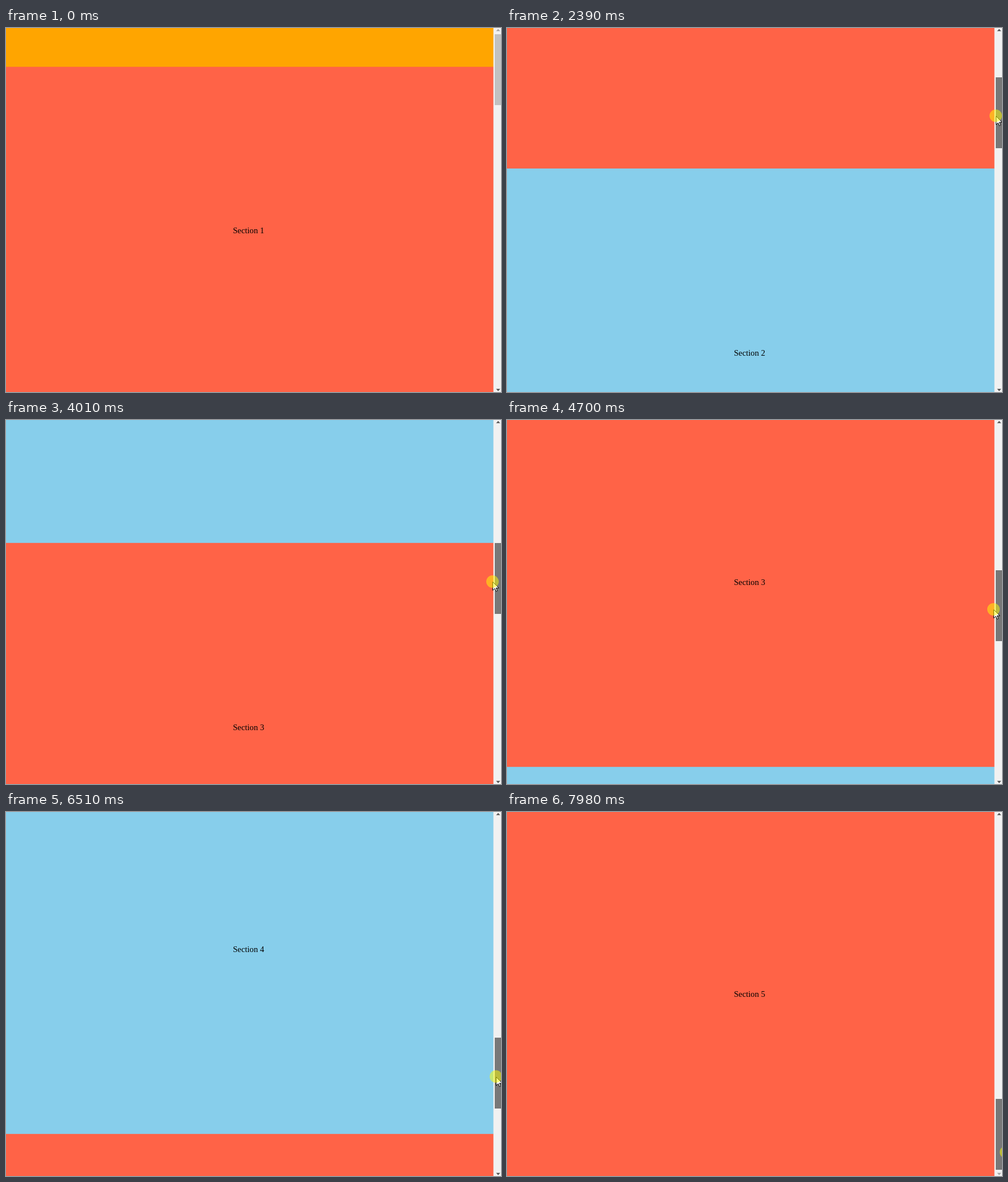
An HTML page with a canvas that plays this animation: 873 by 642 pixels, repeating every 8000 ms.

```html
<!DOCTYPE html>
<html lang="en">
<head>
<meta charset="utf-8">
<title>Scrolling sections</title>
<style>
  html, body { margin: 0; width: 100%; height: 100%; overflow: hidden; }
  canvas { display: block; }
</style>
</head>
<body>
<canvas id="stage" width="873" height="642"></canvas>
<script>
const ctx = document.getElementById('stage').getContext('2d');
const LOOP = 8000, W = 873, H = 642;
const HEADER = 68.5, SECTION = 651, COUNT = 5, PAGE_W = 860, PAGE_H = 3240;
const MAX_SCROLL = PAGE_H - H;
const TRACK_TOP = 11, THUMB = 125, TRAVEL = 495;

// The picture updates in even steps; step 0 is the press on the thumb
const PRESS = 1530, STEP = 77.7;
const FIRST = -17, GRIP = 79;

// Pointer path: step, x, y
const path = [
  [FIRST, 751, 609], [-14, 638, 338], [-12, 638, 338], [-4, 865, GRIP],
  [-1, 865, GRIP], [11, 862, 154.8], [32, 858, 285], [50, 858, 395],
  [64, 864, 466.5], [83, 880, 600]
];

function pointerAt(step) {
  const next = path.findIndex(p => p[0] >= step);
  const b = path[Math.max(1, next)], a = path[path.indexOf(b) - 1];
  const k = Math.max(0, (step - a[0]) / (b[0] - a[0]));
  return [1, 2].map(c => a[c] + (b[c] - a[c]) * k);
}

function rect(color, x, y, w, h) {
  ctx.fillStyle = color;
  ctx.fillRect(x, y, w, h);
}

function drawPage(scroll) {
  rect('#ffa500', 0, -scroll, PAGE_W, Math.ceil(HEADER));
  ctx.font = '14.7px "Liberation Serif", "Times New Roman", serif';
  for (let i = 0; i < COUNT; i++) {
    const edge = SECTION * i - 6.2;
    const top = Math.max(HEADER, edge);
    const bottom = Math.min(PAGE_H, edge + SECTION);
    rect(i % 2 ? '#87ceeb' : '#ff6347', 0, top - scroll, PAGE_W, bottom - top + 1);
    ctx.fillStyle = '#000';
    ctx.fillText('Section ' + (i + 1), 400.2, Math.round((top + bottom) / 2) + 5 - scroll);
  }
}

function arrow(tip, base, active) {
  ctx.fillStyle = active ? '#505050' : '#a3a3a3';
  ctx.beginPath();
  ctx.moveTo(868, tip);
  ctx.lineTo(871.6, base);
  ctx.lineTo(864.4, base);
  ctx.fill();
}

function drawScrollbar(scroll, color) {
  rect('#f1f1f1', PAGE_W - 0.4, 0, W, H);
  arrow(1.8, 5.6, scroll > 0);
  arrow(H - 1.6, H - 5.4, scroll < MAX_SCROLL);
  rect(color, 862, Math.round(TRACK_TOP + TRAVEL * scroll / MAX_SCROLL), W, THUMB);
}

const arrowhead = new Path2D('M.5 .5V15.5L4 12.2L6.4 17.3L8.6 16.3L6.3 11.3H11.2Z');

function drawPointer(x, y) {
  ctx.save();
  ctx.translate(Math.round(x), Math.round(y));
  ctx.fillStyle = '#fff';
  ctx.fill(arrowhead);
  ctx.stroke(arrowhead);
  ctx.restore();
}

function drawHalo(x, y) {
  ctx.fillStyle = 'rgba(255,255,0,.5)';
  ctx.beginPath();
  ctx.arc(x, y, 11, 0, Math.PI * 2);
  ctx.fill();
}

function draw(time) {
  const step = Math.floor((time - PRESS) / STEP + 0.15);
  const [x, y] = pointerAt(step);
  const pressed = step >= 0;
  const dragged = pressed ? (y - GRIP) / 496 * MAX_SCROLL : 0;
  const scroll = Math.round(Math.min(MAX_SCROLL, dragged));
  drawPage(scroll);
  drawScrollbar(scroll, pressed ? '#787878' : x >= 862 && step >= FIRST ? '#a8a8a8' : '#c1c1c1');
  if (step >= FIRST) drawPointer(x, y);
  if (pressed) drawHalo(x, y);
}

const start = performance.now();
function loop() {
  draw((performance.now() - start) % LOOP);
  requestAnimationFrame(loop);
}
loop();
</script>
</body>
</html>
```
